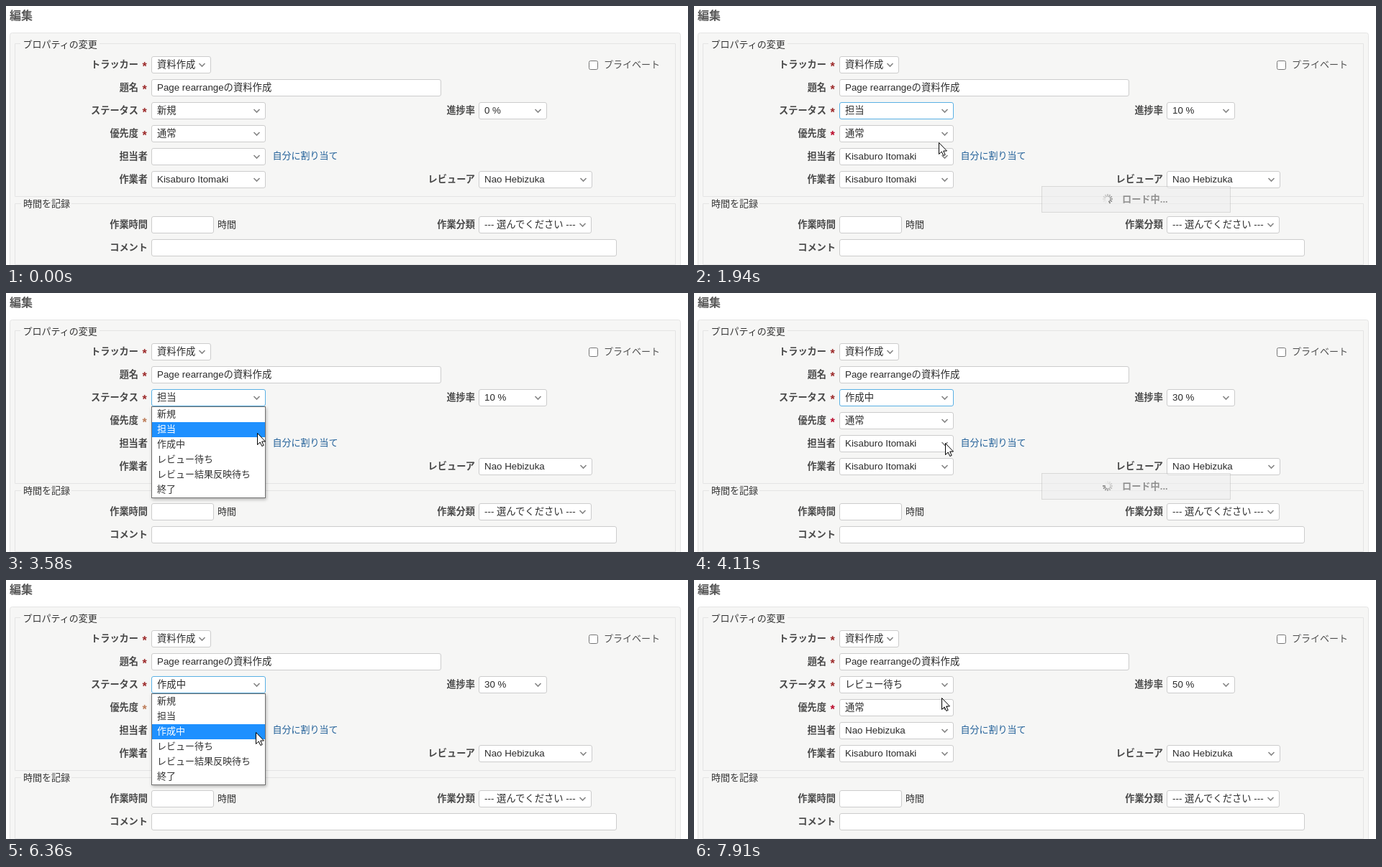
Write an HTML page that moves like this. It is 948 px wide and 361 px high and loops after 8000 ms.

```html
<!DOCTYPE html>
<html lang="ja">
<head>
<meta charset="utf-8">
<title>編集</title>
<style>
html, body { margin: 0; width: 100%; height: 100%; overflow: hidden; background: #fff; }
svg { display: block; }
text { font: 13px "Liberation Sans", "Noto Sans CJK JP", "Noto Sans CJK", sans-serif; fill: #333; white-space: pre; }
.field { font-size: 13.333px; fill: #2b2b2b; }
.label { font-size: 13.2px; font-weight: bold; fill: #4a4a4a; text-anchor: end; }
.star { font-size: 16px; font-weight: bold; fill: #9c2a2a; text-anchor: middle; }
.soft { fill: #505050; }
.link { fill: #205f98; }
.box { fill: #fff; stroke: #ccc; }
.line { fill: none; stroke: #e4e4e4; }
.arrow { fill: none; stroke: #858585; stroke-width: 1.6; }
#popup { filter: drop-shadow(1px 2px 2px rgba(0,0,0,.28)); }
</style>
</head>
<body>
<svg id="stage" width="948" height="361" viewBox="0 0 948 361"></svg>
<script>
const LOOP = 8000;
const WORKER = 'Kisaburo Itomaki', REVIEWER = 'Nao Hebizuka';
const OPTIONS = ['新規', '担当', '作成中', 'レビュー待ち', 'レビュー結果反映待ち', '終了'];
const ROW_TOP = 159, ROW_H = 21;

// Cursor moves: start, end, steps, target x, target y, sideways bend
const MOVES = [
  [230, 780, 8, 349, 149, 0],
  [1170, 1630, 7, 341, 185, 0],
  [1940, 2330, 6, 339, 205, 0],
  [2550, 3030, 7, 351, 145, 0],
  [3330, 3790, 7, 349, 209, 0],
  [4500, 4820, 5, 343, 145, -6],
  [5980, 6530, 8, 348, 225, 0],
  [7690, 7910, 4, 344, 164, 5]
];
// Form values from a time on
const STATES = [
  { at: 0, status: 0, done: '0 %', owner: '' },
  { at: 1860, status: 1, done: '10 %', owner: WORKER },
  { at: 4110, status: 2, done: '30 %', owner: WORKER },
  { at: 6990, status: 3, done: '50 %', owner: REVIEWER }
];
const OPEN = [[930, 1860], [3190, 4110], [5670, 6990]];
const FOCUS = [[930, 2330], [3190, 4190], [5670, 7050]];
const LOADING = [[1860, 2330], [4110, 4190]];

const stage = document.getElementById('stage');

function add(tag, attrs, parent = stage) {
  const el = document.createElementNS('http://www.w3.org/2000/svg', tag);
  for (const key in attrs) el.setAttribute(key, attrs[key]);
  parent.append(el);
  return el;
}
function text(str, x, y, cls = '', parent = stage) {
  const el = add('text', { x, y, class: cls }, parent);
  el.textContent = str;
  return el;
}
function rect(x, y, w, h, attrs, parent) {
  return add('rect', { x: x + .5, y: y + .5, width: w - 1, height: h - 1, ...attrs }, parent);
}
function input(x, y, right, value = '') {
  const box = rect(x, y, right - x, 24, { class: 'box', rx: 2.5 });
  return { box, value: text(value, x + 8, y + 16, 'field') };
}
function select(x, y, right, value) {
  const parts = input(x, y, right, value);
  add('path', { class: 'arrow', d: `M${right - 16.5} ${y + 10}l4 4l4 -4` });
  return parts;
}
function label(str, right, y) {
  text(str, right, y + 16, 'label');
}
function required(str, y) {
  label(str, 184, y);
  return text('*', 192.5, y + 19.5, 'star');
}

// Page
text('編集', 5, 19).style.cssText = 'font-size:16px;font-weight:bold;fill:#555';
rect(5, 37, 933, 340, { rx: 3, fill: '#f6f6f5', stroke: '#e4e4e4' });
add('path', { class: 'line', d: 'M20 52.5H12.5V265.5H930.5V52.5H130' });
add('path', { class: 'line', d: 'M21 275.5H12.5V360.5H930.5V275.5H91' });
text('プロパティの変更', 23.5, 58);
text('時間を記録', 24, 280);

required('トラッカー', 70);
select(202, 70, 285, '資料作成');
rect(810, 76, 13, 13, { rx: 2, fill: '#fff', stroke: '#767676' });
text('プライベート', 831, 86, 'soft');
required('題名', 102);
input(202, 102, 605, 'Page rearrangeの資料作成');
required('ステータス', 134);
const status = select(202, 134, 361, '');
label('進捗率', 652, 134);
const done = select(657, 134, 752, '');
const star = required('優先度', 166);
select(202, 166, 361, '通常');
label('担当者', 197, 198);
const owner = select(202, 198, 361, '');
text('自分に割り当て', 370.5, 213, 'link');
label('作業者', 197, 230);
select(202, 230, 361, WORKER);
label('レビューア', 652, 230);
select(657, 230, 815, REVIEWER);
label('作業時間', 197, 293);
input(202, 293, 289);
text('時間', 294, 309);
label('作業分類', 652, 293);
select(657, 293, 814, '--- 選んでください ---');
label('コメント', 197, 325);
input(202, 325, 849);

// Loading box
const loader = add('g', { opacity: .5 });
rect(483, 251, 263, 37, { fill: '#eee', stroke: '#bbb' }, loader);
text('ロード中...', 595, 274, '', loader).style.cssText = 'font-size:13.2px;font-weight:bold';
const spinner = add('g', {}, loader);
for (let i = 0; i < 12; i++) {
  add('path', {
    d: 'M0 -3.2V-7', stroke: '#111', 'stroke-width': 1.7,
    opacity: (i / 11) ** 1.3, transform: `rotate(${i * 30})`
  }, spinner);
}

// Option list
const popup = add('g', { id: 'popup' });
rect(202, 158, 159, 128, { fill: '#fff', stroke: '#707070' }, popup);
const mark = add('rect', { x: 203, width: 157, height: ROW_H, fill: '#1e90ff' }, popup);
const items = OPTIONS.map((name, i) => text(name, 210, ROW_TOP + 14 + i * ROW_H, '', popup));

const cursor = add('path', {
  d: 'M.5 .5V16.5L4.2 13L6.8 18.5L9.2 17.4L6.7 12H11.5Z',
  fill: '#fff', stroke: '#000', 'stroke-linejoin': 'round'
});

const within = (spans, t) => spans.some(([from, to]) => t >= from && t < to);
const show = (el, on) => { el.style.display = on ? '' : 'none'; };

function cursorAt(t) {
  let x = 820, y = 361;
  for (const [from, to, steps, tx, ty, bend] of MOVES) {
    if (t < from) break;
    const gap = (to - from) / (steps - 1);
    const step = Math.min(steps, Math.floor((t - from) / gap + 1.08));
    const p = Math.sin(Math.PI / 2 * step / steps);
    x += (tx - x) * p + bend * Math.sin(Math.PI * p);
    y += (ty - y) * p;
  }
  return [Math.round(x), Math.round(y)];
}

function draw(t) {
  const state = STATES.filter(s => t >= s.at).pop();
  const open = within(OPEN, t);
  const [x, y] = cursorAt(t);

  status.value.textContent = OPTIONS[state.status];
  done.value.textContent = state.done;
  owner.value.textContent = state.owner;
  status.box.style.stroke = within(FOCUS, t) ? '#5ab0e4' : '';
  star.style.fill = open ? '#bd7c58' : t < 1860 ? '' : '#bb0a2c';

  show(popup, open);
  const row = y < ROW_TOP ? state.status : Math.floor((y - ROW_TOP) / ROW_H);
  mark.setAttribute('y', ROW_TOP + row * ROW_H);
  items.forEach((el, i) => { el.style.fill = i === row ? '#fff' : ''; });

  show(loader, within(LOADING, t));
  spinner.setAttribute('transform', `translate(575 269) rotate(${Math.floor(t / 78) * 30 + 180})`);

  show(cursor, t >= 230);
  cursor.setAttribute('transform', `translate(${x} ${y})`);
}

function tick() {
  draw(performance.now() % LOOP);
  requestAnimationFrame(tick);
}
tick();
</script>
</body>
</html>
```
